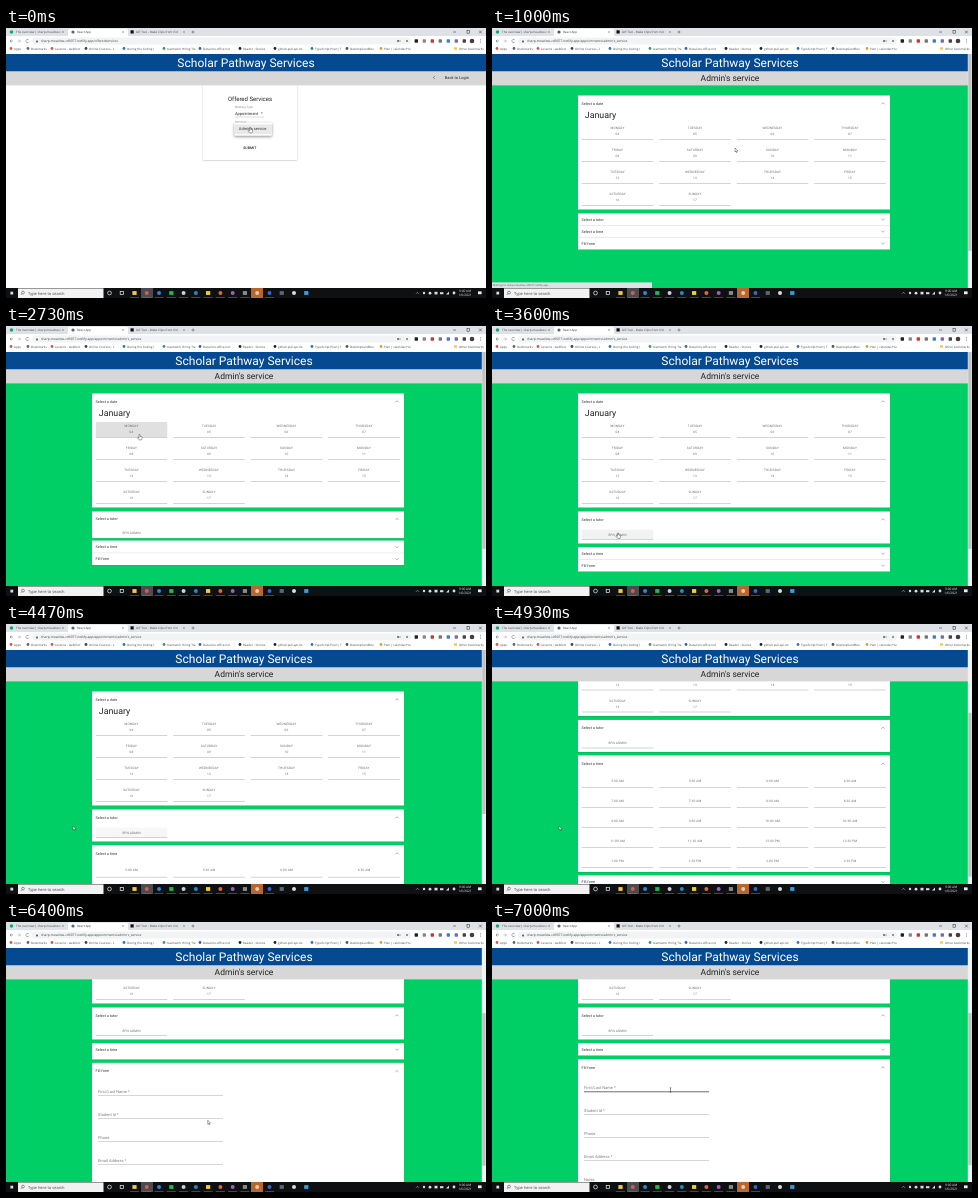
An HTML page with a canvas for the animation above (7070 ms loop, 480 px wide and 270 px high).

```html
<!DOCTYPE html>
<html lang="en">
<head>
<meta charset="utf-8">
<title>Booking demo</title>
<style>
  html, body { margin: 0; width: 100%; height: 100%; overflow: hidden; background: #fff; }
  canvas { display: block; width: 480px; height: 270px; }
</style>
</head>
<body>
<canvas id="stage"></canvas>
<script>
const LOOP = 7070, W = 480, H = 270;
const VIEW_TOP = 26, VIEW_BOTTOM = 260, VIEW_H = VIEW_BOTTOM - VIEW_TOP;
const BAR_TOP = 43.25, BAR_BOTTOM = 57.4, MIN_PAGE = 278;
const BLUE = '#054a91', GREY = '#d7d7d7', GREEN = '#00cf65';
const FONT = 'Roboto, Arial, sans-serif', UI = '"Open Sans", "Noto Sans", sans-serif';
const canvas = document.getElementById('stage');
const ctx = canvas.getContext('2d');
const dpr = window.devicePixelRatio || 1;
canvas.width = W * dpr;
canvas.height = H * dpr;

// Timing helpers
const clamp = v => Math.max(0, Math.min(1, v));
const ramp = (t, a, b) => clamp((t - a) / (b - a));
const smooth = p => p * p * (3 - 2 * p);
const ease = (t, a, b) => smooth(ramp(t, a, b));
const expand = (t, a, b) => smooth(1 - Math.pow(1 - ramp(t, a, b), 1.4));
const pulse = (t, a, b, c, d) => ramp(t, a, b) * (1 - ramp(t, c, d));

// Drawing helpers
function rect(x, y, w, h, color) {
  ctx.fillStyle = color;
  ctx.fillRect(x, y, w, h);
}
function round(x, y, w, h, r, color) {
  ctx.fillStyle = color;
  ctx.beginPath();
  ctx.roundRect(x, y, w, h, r);
  ctx.fill();
}
function dot(x, y, r, color) {
  ctx.fillStyle = color;
  ctx.beginPath();
  ctx.arc(x, y, r, 0, 7);
  ctx.fill();
}
function line(points, color, width = 0.5) {
  ctx.strokeStyle = color;
  ctx.lineWidth = width;
  ctx.beginPath();
  points.forEach(([x, y], i) => i ? ctx.lineTo(x, y) : ctx.moveTo(x, y));
  ctx.stroke();
}
function shape(points, fill, stroke) {
  ctx.beginPath();
  points.forEach(([x, y], i) => i ? ctx.lineTo(x, y) : ctx.moveTo(x, y));
  ctx.closePath();
  ctx.fillStyle = fill;
  ctx.fill();
  if (stroke) {
    ctx.strokeStyle = stroke;
    ctx.lineWidth = 0.4;
    ctx.stroke();
  }
}
function text(str, x, y, size, color, { align = 'left', weight = 400, family = FONT, gap = 0 } = {}) {
  ctx.font = `${weight} ${size}px ${family}`;
  ctx.letterSpacing = gap + 'px';
  ctx.textAlign = align;
  ctx.textBaseline = 'alphabetic';
  ctx.fillStyle = color;
  ctx.fillText(str, x, y);
}
function shadowed(alpha, blur, dy, draw) {
  ctx.save();
  ctx.shadowColor = `rgba(0,0,0,${alpha})`;
  ctx.shadowBlur = blur * dpr;
  ctx.shadowOffsetY = dy * dpr;
  draw();
  ctx.restore();
}
function clip(x, y, w, h, draw) {
  ctx.save();
  ctx.beginPath();
  ctx.rect(x, y, w, h);
  ctx.clip();
  draw();
  ctx.restore();
}

// Browser window
const bookmarks = [
  [5, 'Apps', '#d9584a'], [22, 'Bookmarks', '#666'], [46, 'Lessons - webfoot', '#e0533f'],
  [80, 'Online Courses - L', '#444'], [118, 'During the Coding I', '#2f6fd0'],
  [158, 'teamwork Hiring Tra', '#3a9c5c'], [194, 'Data-lists.office.not', '#2a66b8'],
  [234, 'Reader - Stories', '#222'], [269, 'github.pull.api.do', '#222'],
  [306, 'TypeScript Pract| T', '#2f74c0'], [341, 'DesktopSandBox', '#555'],
  [375, 'Plan | calendar/Hu', '#e0a030']
];
const extensions = ['#222', '#8a8a8a', '#d8342c', '#777', '#3d7fd6', '#7b6bb0', '#444'];

function drawBrowser(t) {
  const tiny = { family: UI };
  rect(0, 0, W, 8, '#dee1e6');
  dot(5.5, 4, 1.8, '#17a673');
  text('The overview | sharp-meadow-c', 10, 5.2, 3, '#444', tiny);
  round(62, 0.8, 60, 8, 1.5, '#fff');
  const loading = t > 700 && t < 1400;
  dot(67, 4, 1.6, loading ? '#4d5357' : '#4a6b78');
  text('React App', 71, 5.2, 3, '#333', tiny);
  rect(124.5, 2.3, 3.2, 3.2, '#111');
  text('GIF Tool - Make Clips from Vid', 130, 5.2, 3, '#444', tiny);
  for (const x of [57, 117, 178]) {
    line([[x - 0.8, 3.2], [x + 0.8, 4.8]], '#555', 0.4);
    line([[x + 0.8, 3.2], [x - 0.8, 4.8]], '#555', 0.4);
  }
  line([[185.5, 4], [188.5, 4]], '#444');
  line([[187, 2.5], [187, 5.5]], '#444');
  line([[447, 4], [450, 4]], '#222');
  ctx.strokeRect(461, 2.6, 2.6, 2.6);
  line([[473, 2.6], [475.8, 5.4]], '#222');
  line([[475.8, 2.6], [473, 5.4]], '#222');

  rect(0, 8, W, 18, '#fff');
  line([[7, 13], [4, 13]], '#555');
  line([[5.4, 11.5], [4, 13], [5.4, 14.5]], '#555');
  line([[11.5, 13], [14.5, 13]], '#999');
  line([[13.1, 11.5], [14.5, 13], [13.1, 14.5]], '#999');
  ctx.beginPath();
  ctx.arc(21.5, 13, 1.6, 0.4, 5.6);
  ctx.strokeStyle = '#555';
  ctx.stroke();
  round(26, 9.4, 379, 7.2, 3.6, '#f1f3f4');
  rect(30, 12.6, 2, 1.8, '#666');
  const path = t < 800 ? 'offeredservices' : 'appointments/admin\'s_service';
  text('sharp-meadow-cd9077.netlify.app/' + path, 35, 14.2, 3.3, '#444', tiny);
  dot(392, 13, 0.9, '#555');
  line([[392, 13], [395, 13]], '#555');
  dot(401, 13, 1, '#777');
  extensions.forEach((c, i) => round(408.6 + i * 8, 11.3, 3.4, 3.4, 0.7, c));
  dot(466, 13, 2.3, '#4a3a3a');
  for (const y of [11.4, 13, 14.6]) dot(474.5, y, 0.45, '#444');

  for (const [x, label, color] of bookmarks) {
    dot(x, 20.5, 1.4, color);
    text(label, x + 3, 21.6, 3, '#444', tiny);
  }
  rect(448, 19.3, 3, 2.4, '#efc95a');
  text('Other bookmarks', 453, 21.6, 3, '#444', tiny);
}

const apps = ['#f3c94b', '#e2584a', '#2f87d8', '#1db954', '#c9d3dc', '#2489ca', '#f2d230',
  '#e8643c', '#9a63b5', '#8a8a8a', '#e9c9a8', '#3568c8', '#5c6570', '#dcdcdc', '#3a9be0'];

function drawTaskbar() {
  rect(0, 260, W, 10, '#0f1012');
  rect(4.4, 263.7, 2.8, 2.8, '#ddd');
  rect(12, 260.4, 85.5, 9.6, '#f2f2f2');
  ctx.strokeStyle = '#333';
  ctx.lineWidth = 0.5;
  ctx.beginPath();
  ctx.arc(17, 264.6, 1.4, 0, 7);
  ctx.stroke();
  line([[16, 265.6], [14.8, 266.9]], '#333');
  text('Type here to search', 22, 266.7, 4, '#444', { family: UI });
  ctx.beginPath();
  ctx.arc(103.5, 265, 1.9, 0, 7);
  ctx.strokeStyle = '#eee';
  ctx.lineWidth = 0.7;
  ctx.stroke();
  ctx.strokeRect(114.2, 263.4, 3.4, 3.2);
  rect(135, 260, 12, 10, '#4a4c50');
  rect(245, 260, 12, 10, '#b5672f');
  apps.forEach((c, i) => {
    const x = 128.5 + i * 12.27;
    if (i % 3 === 0 || i === 14) rect(x - 2.1, 263.1, 4.2, 3.8, c);
    else dot(x, 265, 2, c);
    if (i < 12) rect(x - 4.5, 269.5, 9, 0.5, '#5f87ad');
  });
  line([[410, 265.8], [411.5, 264.3], [413, 265.8]], '#ddd');
  dot(418, 265, 1.2, '#ddd');
  dot(424, 265.2, 1.4, '#ddd');
  rect(428.5, 263.8, 3, 2.6, '#ddd');
  rect(434, 264.2, 3.4, 2, '#ddd');
  shape([[440, 266.5], [443, 263.5], [443, 266.5]], '#ddd');
  dot(448, 265, 1.4, '#ddd');
  text('9:00 AM', 459, 264.2, 3.2, '#eee', { align: 'center', family: UI });
  text('1/6/2021', 459, 268.2, 3.2, '#eee', { align: 'center', family: UI });
  rect(472, 263.4, 3.6, 2.8, '#eee');
}

function drawHeader(cx) {
  rect(0, VIEW_TOP, W, BAR_BOTTOM - VIEW_TOP, GREY);
  rect(0, VIEW_TOP, W, BAR_TOP - VIEW_TOP, BLUE);
  text('Scholar Pathway Services', cx, 38.8, 12, '#fff', { align: 'center' });
}

// First page: choose a service
function triangle(x, y) {
  shape([[x - 1.2, y - 0.6], [x + 1.2, y - 0.6], [x, y + 0.7]], '#777');
}
function drawServices(t) {
  rect(0, 26, W, VIEW_H, '#fff');
  shadowed(0.3, 1.6, 0.6, () => rect(197, 54, 94, 78, '#fff'));
  drawHeader(240);
  line([[428.8, 48.3], [427.3, 49.6], [428.8, 50.9]], '#333');
  text('Back to Login', 438.8, 50.8, 4, '#222');

  text('Offered Services', 244, 73.4, 6, '#222', { align: 'center' });
  text('Booking Type', 229, 80.2, 3, '#888');
  text('Appointment', 229, 86.5, 4, '#222');
  triangle(255.8, 85);
  rect(229, 88.8, 29, 0.4, '#aaa');
  text('Services', 229, 95.2, 3, '#888');
  const open = 1 - ramp(t, 150, 300);
  if (t > 150) text("Admin's service", 229, 102.5, 4, '#222');
  triangle(259.5, 101);
  rect(229, 104.8, 33, 0.4, '#aaa');
  if (open > 0) {
    ctx.globalAlpha = open;
    shadowed(0.45, 3, 1, () => round(228.3, 94.6, 37.6, 13.2, 1, '#fff'));
    rect(228.3, 96.4, 37.6, 9.8, '#e9e9e9');
    text("Admin's service", 232.8, 102.4, 4, '#333');
    ctx.globalAlpha = 1;
  }
  const hover = ramp(t, 480, 600) * 0.06 + ramp(t, 640, 720) * 0.1;
  if (hover) round(234, 114.5, 19.5, 9.5, 1, `rgba(0,0,0,${hover})`);
  text('SUBMIT', 243.8, 120.6, 3.5, '#222', { align: 'center', weight: 500, gap: 0.1 });
}

// Second page: accordion of booking steps
const days = ['MONDAY', 'TUESDAY', 'WEDNESDAY', 'THURSDAY', 'FRIDAY', 'SATURDAY', 'SUNDAY'];
const colX = c => 89.7 + c * 77.5;

function button(col, y, h, labels, tint) {
  const x = colX(col), w = 71.6;
  if (tint > 0) round(x, y, w, h, 0.6, `rgba(0,0,0,${tint})`);
  rect(x, y + h - 0.1, w, 0.7, '#c2c2c2');
  labels.forEach(([str, dy]) =>
    text(str, x + w / 2, y + dy, 3.2, '#6c6c6c', { align: 'center', gap: 0.13 }));
}
function dateBody(y, t) {
  text('January', 92.8, y + 6.8, 8.8, '#222');
  const tint = 0.04 * pulse(t, 2030, 2130, 3050, 3200) + 0.08 * pulse(t, 2380, 2530, 2800, 3100);
  for (let i = 0; i < 14; i++) {
    const num = String(4 + i).padStart(2, '0');
    button(i % 4, y + 12.6 + 22 * Math.floor(i / 4), 15.2, [[days[i % 7], 5.2], [num, 11.3]], i ? 0 : tint);
  }
}
function tutorBody(y, t) {
  const tint = 0.05 * pulse(t, 3380, 3500, 4300, 4750) + 0.08 * pulse(t, 3850, 3980, 4050, 4450);
  button(0, y + 2.2, 9.6, [['BFN ADMIN', 5.8]], tint);
}
function timeBody(y, t) {
  const tint = 0.05 * pulse(t, 5820, 5930, 6200, 6350) + 0.1 * pulse(t, 6040, 6110, 6200, 6350);
  for (let i = 0; i < 20; i++) {
    const half = 10 + i, hour = Math.floor(half / 2);
    const label = `${(hour + 11) % 12 + 1}:${half % 2 ? '30' : '00'} ${hour < 12 ? 'AM' : 'PM'}`;
    button(i % 4, y + 3 + 20 * Math.floor(i / 4), 12.4, [[label, 6.9]], i === 13 ? tint : 0);
  }
}
function formBody(y, t) {
  ['First/Last Name *', 'Student Id *', 'Phone', 'Email Address *', 'Notes'].forEach((label, i) => {
    const top = y + 23 * i;
    text(label, 92, top + 13.9, 4, '#7c7c7c');
    const active = i === 0 && t > 6900;
    rect(92, top + 16, 125, active ? 0.7 : 0.4, active ? '#333' : '#999');
  });
  text('SUBMIT', 104, y + 120, 3.5, '#222', { align: 'center', weight: 500, gap: 0.1 });
}
const panels = [
  { title: 'Select a date', body: 98, draw: dateBody, open: () => 1 },
  { title: 'Select a tutor', body: 16, draw: tutorBody, open: t => expand(t, 2570, 2870) },
  { title: 'Select a time', body: 100, draw: timeBody, open: t => expand(t, 4010, 4330) - expand(t, 6150, 6470) },
  { title: 'Fill form', body: 126, draw: formBody, open: t => expand(t, 6150, 6470) }
];

function layout(t) {
  let y = 67.5, prev = 0;
  return panels.map((panel, i) => {
    const open = clamp(panel.open(t));
    if (i) y += 4 * Math.max(prev, open);
    const head = 12 + 4 * open, h = head + panel.body * open;
    const box = { panel, y, h, head, open };
    y += h;
    prev = open;
    return box;
  });
}
function drawPanel({ panel, y, h, head, open }, t) {
  const mid = y + head / 2;
  text(panel.title, 89.6, mid + 1.2, 3.75, '#333');
  const tip = 0.8 * (1 - 2 * open);
  line([[389.4, mid - tip], [391, mid + tip], [392.6, mid - tip]], '#666');
  if (open > 0) clip(85, y + head, 314, h - head, () => panel.draw(y + head, t));
}
function drawPaper({ y, h }, i) {
  // Overlap upwards slightly so touching panels leave no seam
  rect(86, y + h, 312, 0.4, 'rgba(0,0,0,0.2)');
  rect(86, y - (i > 1 ? 0.4 : 0), 312, h + (i > 1 ? 0.4 : 0), '#fff');
  if (i > 1) rect(86, y - 0.3, 312, 0.4, '#d4d4d4');
}
function drawBooking(t) {
  rect(0, 26, W, VIEW_H, GREEN);
  const scroll = 100 * Math.sin(ramp(t, 4500, 5110) * Math.PI / 2);
  const boxes = layout(t);
  const last = boxes[3];
  const total = Math.max(MIN_PAGE, last.y + last.h + 6.5 - VIEW_TOP);
  clip(0, 57, 476, 203, () => {
    ctx.translate(0, -scroll);
    boxes.forEach(drawPaper);
    boxes.forEach(box => drawPanel(box, t));
  });
  drawHeader(238);
  text("Admin's service", 238, 53, 8.5, '#222', { align: 'center' });
  rect(475.8, VIEW_TOP, 4.2, VIEW_H, '#f1f1f1');
  const k = VIEW_H / total;
  rect(476.2, VIEW_TOP + scroll * k, 3.4, VIEW_H * k, '#c1c1c1');
}
function drawStatus(t) {
  if (t < 700 || t >= 1400) return;
  rect(0, 254.4, 160, 5.6, '#dee1e6');
  text('Waiting for sharp-meadow-cd9077.netlify.app...', 0.8, 258.3, 2.6, '#555', { family: UI });
}

// Pointer: time, x, y
const track = [
  [0, 244, 99.5], [180, 244, 99.5], [560, 243, 119], [730, 243, 120], [1600, 243, 120],
  [2130, 133.5, 108.5], [3000, 133.5, 108.5], [3500, 126, 207], [4150, 126, 207],
  [4460, 67, 202], [5270, 67, 202], [5600, 149.5, 215], [5930, 203, 206],
  [6150, 203, 206], [6720, 200, 187], [6790, 200, 187], [7000, 178.5, 168], [LOOP, 178.5, 168]
];
const handTimes = [[0, 280], [480, 800], [2030, 3060], [3380, 4230], [5800, 6300]];

function drawPointer(t) {
  const i = Math.max(1, track.findIndex(k => k[0] > t));
  const [t0, x0, y0] = track[i - 1], [t1, x1, y1] = track[i];
  const p = ease(t, t0, t1);
  ctx.save();
  ctx.translate(x0 + (x1 - x0) * p, y0 + (y1 - y0) * p);
  if (t > 6900) {
    line([[0, -2.2], [0, 2.2]], '#222');
    line([[-0.9, -2.2], [0.9, -2.2]], '#222', 0.4);
    line([[-0.9, 2.2], [0.9, 2.2]], '#222', 0.4);
  } else if (handTimes.some(([a, b]) => t >= a && t < b)) {
    shape([[-0.5, 0], [0.5, 0], [0.6, 1.9], [2.6, 2.4], [2.6, 4], [2, 5.4], [-0.4, 5.4],
      [-2, 3.4], [-1.6, 2.8], [-0.5, 3.4]], '#fff', '#222');
  } else {
    shape([[0, 0], [0, 4], [0.9, 3.2], [1.5, 4.6], [2.1, 4.3], [1.6, 3], [2.8, 2.9]], '#fff', '#222');
  }
  ctx.restore();
}

function draw(t) {
  ctx.setTransform(dpr, 0, 0, dpr, 0, 0);
  ctx.textRendering = 'geometricPrecision';
  if (t < 800) drawServices(t);
  else drawBooking(t);
  drawBrowser(t);
  drawStatus(t);
  drawTaskbar();
  drawPointer(t);
}

const start = performance.now();
function tick() {
  draw((performance.now() - start) % LOOP);
  requestAnimationFrame(tick);
}
tick();
</script>
</body>
</html>
```
